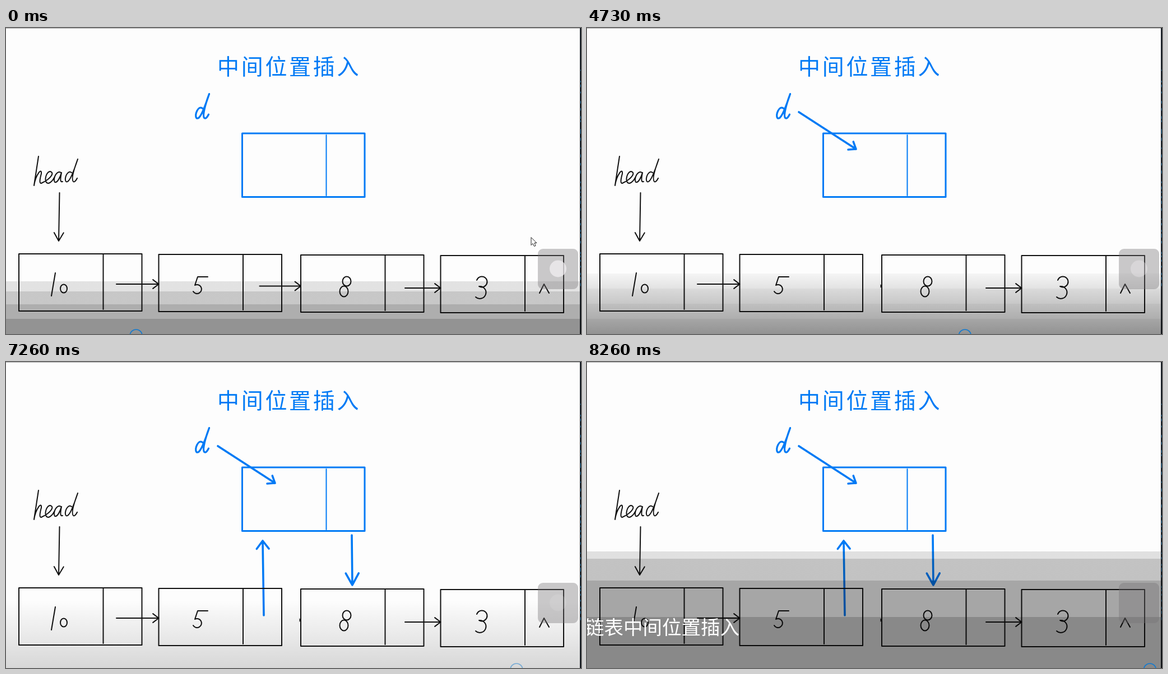
An HTML page for the animation above (8360 ms loop, 1026 by 546 pixels).

```html
<!DOCTYPE html>
<html lang="zh">
<head>
<meta charset="utf-8">
<style>
  html, body { margin: 0; width: 1026px; height: 546px; overflow: hidden; background: #fdfdfd; }
  svg, .shade { position: absolute; left: 0; top: 0; width: 1026px; height: 546px; }
  path, rect, circle, ellipse { fill: none; stroke-linecap: round; stroke-linejoin: round; }
  text { font-family: "Noto Sans CJK SC", "Noto Sans CJK", sans-serif; }
  .ink { stroke: #111; stroke-width: 2; }
  .blue { stroke: #007af5; stroke-width: 3; }
  #arrows { stroke-width: 3.6; }
  #title { font-size: 39px; letter-spacing: 3.7px; fill: #007af5; stroke: none; }
  #caption { font-size: 34.5px; font-weight: 300; fill: #fff; }
</style>
</head>
<body>
<svg viewBox="0 0 1026 546">
  <defs>
    <clipPath id="keep"><rect id="keepBox" y="440" width="100" height="45"/></clipPath>
    <path id="d" d="M9 6C2 0-5 17-1 22C4 25 10 12 20-18C14-2 8 18 12 22Q15 24 19 16"/>
  </defs>
  <path d="M0 .5H1024" stroke="#aaa"/>
  <g id="edge"></g>
  <g class="blue">
    <text id="title" x="377" y="83">中间位置插入</text>
    <use href="#d" transform="translate(341 137) scale(1.08)"/>
    <path d="M421.500 188H640V301.500H421.500Z"/>
    <path d="M571.500 191V299" stroke-width="2"/>
    <g id="arrows"></g>
  </g>
  <g class="ink">
    <path d="M58 229L50 281C53 262 64 248 63 260Q58 278 63 277C82 268 87 257 78 256C70 258 67 278 76 277Q82 275 86 267"/>
    <path d="M98 258C90 253 83 270 87 275C92 277 97 265 99 258C97 268 96 276 101 274"/>
    <use href="#d" x="108" y="252"/>
    <g id="list"></g>
    <path d="M88 437L81 478"/>
    <ellipse cx="103" cy="465" rx="6" ry="7.500"/>
    <path d="M360 444H342L337 459A8 8 0 1 1 334 470"/>
    <ellipse cx="608" cy="452" rx="7.500" ry="8.500"/>
    <ellipse cx="603" cy="470" rx="7.500" ry="9.500"/>
    <path d="M840 450A9.500 9.500 0 1 1 844 461A11 11 0 1 1 838 480"/>
    <path d="M952 473L960 457L969 473"/>
  </g>
</svg>

<div id="shades"></div>

<svg viewBox="0 0 1026 546">
  <rect x="949" y="394" width="72" height="72" rx="9" style="fill:#746f7460"/>
  <circle id="knob" cx="985" cy="429.500" r="15" style="fill:#f4f1f4"/>
  <circle id="progress" cy="549" r="11" stroke="#147bd0" stroke-width="1.700"/>
  <path id="cursor" d="M0 0V13.500L3 10.500L5.500 15.500L8 14.500L6 9.500H9.500Z" stroke="#222" style="fill:#fff"/>
  <text id="caption" x="-4" y="486">链表中间位置插入</text>
</svg>

<script>
const $ = id => document.getElementById(id);
const LOOP = 8360, HEIGHT = 546;
const span = (t, from, to) => Math.max(0, Math.min(1, (t - from) / (to - from)));
const mix = (a, b, k) => a + (b - a) * k;

// One continuous pen stroke: shaft, then both barbs
function arrow(x1, y1, x2, y2, barb = 13, spread = .65) {
  const angle = Math.atan2(y2 - y1, x2 - x1);
  const side = s => `${x2 - barb * Math.cos(angle + s)} ${y2 - barb * Math.sin(angle + s)}`;
  return `M${x1} ${y1}L${x2} ${y2}L${side(spread)}L${x2} ${y2}L${side(-spread)}`;
}

// Linked list: nodes, and an arrow from each node to the next
const nodeX = [23, 272.5, 526, 775.5];
let list = `<path d="${arrow(95.5, 294, 94, 380, 17, .52)}"/>`;
nodeX.forEach((x, i) => {
  const top = 403 + i, mid = 457 + i * 3.5;
  list += `<path d="M${x} ${top}h219.500v102h-219.500zM${x + 150.5} ${top}v99"/>`;
  if (i < 3) list += `<path ${i == 1 ? 'clip-path="url(#keep)"' : ''}
    d="${arrow(x + 174 + i * 6, mid, nodeX[i + 1], mid)}"/>`;
});
$('list').innerHTML = list;

// Arrows drawn by pen
const strokes = [
  { from: 690, to: 1900, path: arrow(378, 150, 480, 216, 14) },
  { from: 4880, to: 5400, path: arrow(460, 452, 458, 319, 18) },
  { from: 5510, to: 6060, path: arrow(617, 309, 618, 398, 24, .5) },
];
$('arrows').innerHTML = strokes.map(s =>
  `<path d="${s.path}" pathLength="1" stroke-dasharray="1 2"/>`).join('');

// Dark window edge with blue flecks
let seed = 7;
const random = () => (seed = seed * 16807 % 2147483647) / 2147483647;
let edge = '<path d="M1025 0V546" stroke="#12181f" stroke-width="2"/>';
for (let y = 75; y < 470; y += 3 + random() * 18) {
  edge += `<path d="M1025.500 ${y}v${1 + random() * 4}" stroke="#2878a8"/>`;
}
$('edge').innerHTML = edge;

// Four darkening bands down to the bottom; soft 0 gives hard steps, 1 a smooth ramp
function shade(top, power, dark, soft) {
  const stops = [], y = i => top + (HEIGHT - top) * (i / 4) ** power;
  const stop = (level, at) => stops.push(`rgba(0,0,0,${dark * level / 4}) ${at}px`);
  stop(0, top);
  for (let i = 0; i < 4; i++) {
    stop(i + 1 - soft, y(i));
    stop(i + 1, y(i + 1));
  }
  return `<div class="shade" style="background:linear-gradient(${stops})"></div>`;
}
$('shades').innerHTML = shade(452, 1.2, .42, 0) + shade(438, 1, .42, .7)
  + shade(425, 1, .15, 1) + shade(362, 1, .18, 1) + shade(338, 2, .46, 0);
const shades = [...$('shades').children];

function draw(t) {
  strokes.forEach(({ from, to }, i) => {
    const p = span(t, from, to), path = $('arrows').children[i];
    path.style.display = p ? '' : 'none';
    path.setAttribute('stroke-dashoffset', 1 - p);
  });
  $('keepBox').setAttribute('x', mix(440, 523.5, span(t, 2690, 3900)));

  const fade = span(t, 6600, 7200);
  const opening = t < 300, ending = t >= 8110, captioned = t >= 8260;
  const middle = !opening && !ending;
  [opening, middle * (1 - fade), middle * fade, ending && !captioned, captioned]
    .forEach((v, i) => shades[i].style.opacity = +v);
  $('knob').style.opacity = opening ? .7 : captioned ? 0 : mix(.35, .15, fade);
  $('progress').setAttribute('cx', 232 + t * .0935);
  $('progress').style.opacity = captioned ? 1 : 1 - fade / 2;
  $('caption').style.opacity = captioned ? 1 : ending ? .35 : 0;

  const leave = span(t, 150, 650), hover = span(t, 1990, 2400);
  const x = hover ? mix(480, 461, hover) + 54 * span(t, 2690, 3300) : mix(937, 380, leave);
  const y = hover ? mix(215, 451, hover) : mix(374, 150, leave);
  $('cursor').setAttribute('transform', `translate(${x} ${y})`);
  $('cursor').style.display = t < 650 || (hover && t < 3300) ? '' : 'none';
}

const start = performance.now();
function tick() {
  draw((performance.now() - start) % LOOP);
  requestAnimationFrame(tick);
}
tick();
</script>
</body>
</html>
```
